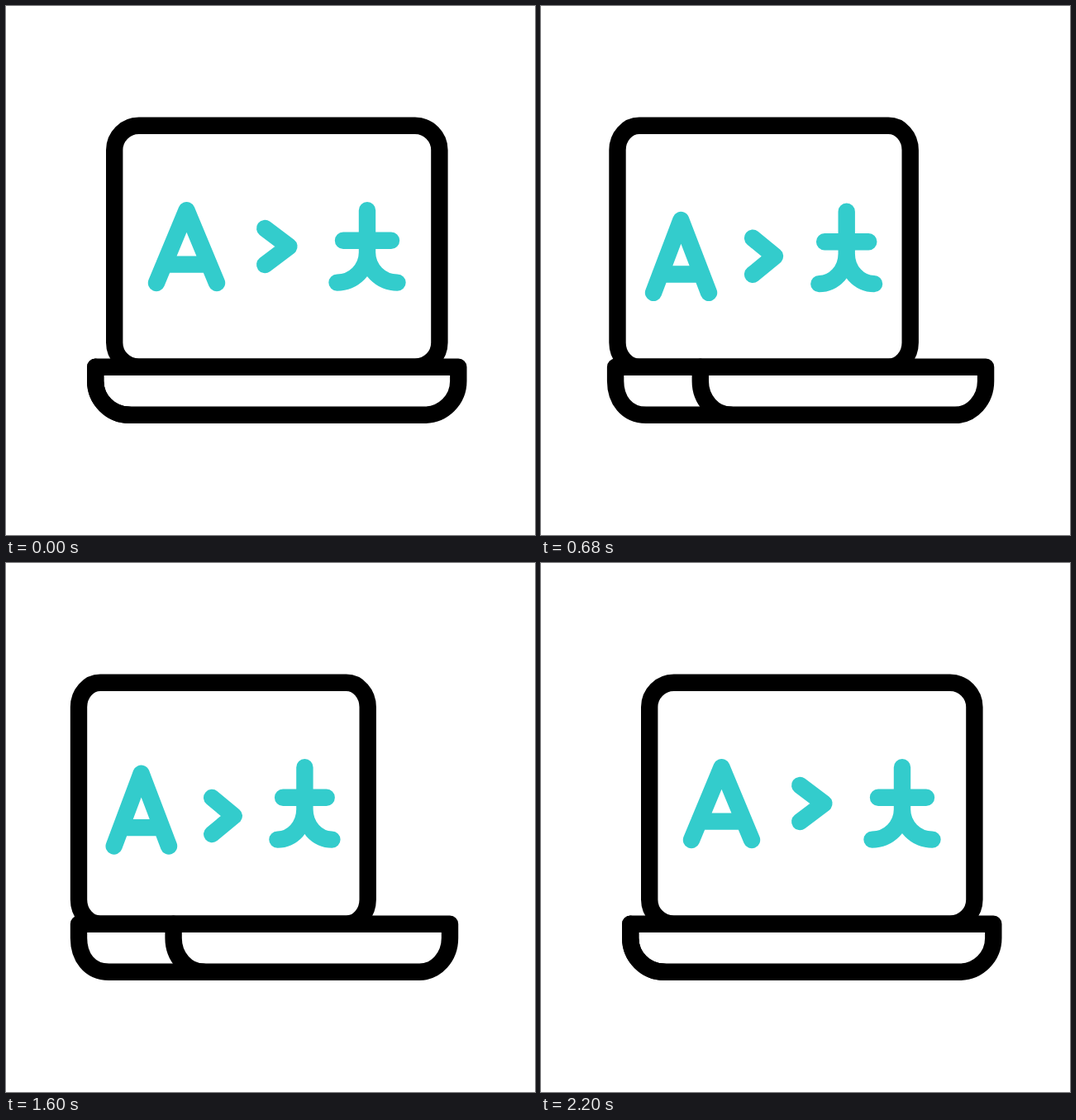
Animation of 640x640 px, one loop 2400 ms. Source, as an HTML page:

```html
<!DOCTYPE html>
<html lang="en">
<head>
<meta charset="utf-8">
<title>Translating laptop</title>
<style>
  html, body { margin: 0; height: 100%; overflow: hidden; background: #fff; }
  svg { display: block; width: 100vw; height: 100vh; }
  path { fill: none; stroke: #000; stroke-width: 20.4; stroke-linecap: round; stroke-linejoin: round; }
  .glyph { stroke: #33cccc; }
</style>
</head>
<body>
<svg viewBox="0 0 640 640">
  <path id="screen"/>
  <path id="side"/>
  <path id="panel"/>
  <path id="latin" class="glyph"/>
  <path id="arrow" class="glyph"/>
  <path id="han" class="glyph"/>
</svg>
<script>
const LOOP = 2400, STEP = 20, SWING = 15;
const ease = u => {
  u = Math.min(1, Math.max(0, u));
  return u * u * (3 - 2 * u);
};

// How far the laptop is turned: 0 faces front, 1 is fully turned
const turn = t => ease((t - 200) / 600) - ease((t - 1600) / 600);

// Down, up, down and back to rest, 400 ms for each move
const bob = (t, start) => {
  const e = i => ease((t - start) / 400 - i);
  return SWING * (e(0) - 2 * e(1) + 2 * e(2) - e(3));
};

const draw = (id, d) => document.getElementById(id).setAttribute("d", d);
const glyph = (id, d, y) => {
  draw(id, d);
  document.getElementById(id).setAttribute("transform", `translate(0 ${y})`);
};

function render(t) {
  const p = turn(t);
  const mix = (a, b) => a + (b - a) * p;
  const bow = 4 * p * (1 - p);

  // Screen
  const l = mix(131.2, 88), r = mix(524.4, 437.7), c = mix(29.5, 26);
  const corner = (dx, dy) => `a${c} 29.5 0 0 1 ${dx * c} ${dy * 29.5}`;
  draw("screen", `M${l + c} 144.8H${r - c}${corner(1, 1)}V407.2${corner(-1, 1)}
    H${l + c}${corner(-1, -1)}V174.3${corner(1, -1)}Z`);

  // Base: front panel and the side that turns into view
  const pl = mix(108.2, 202.6), pr = mix(547.3, 537), pc = mix(41, 36.7);
  draw("panel", `M${pl} 436.7V453.8a${pc} 41 0 0 0 ${pc} 41H${pr - pc}
    a${pc} 41 0 0 0 ${pc} -41V436.7Z`);
  const sl = mix(108.2, 88), sc = mix(41, 36.5), k = mix(0.45, 0.35);
  draw("side", `M${pl} 436.7H${sl}V453.8
    c0 22.6 ${sc * k} 41 ${sc} 41H${pl + pc}`);

  // Letter A
  const ax = mix(218.5, 163.6), al = mix(182, 130.7), ar = mix(255, 197);
  const bar = 0.745;
  glyph("latin", `M${al} 335L${ax} 247.2L${ar} 335
    M${ax + (al - ax) * bar} 312.6H${ax + (ar - ax) * bar}`, bob(t, 200));

  // Arrow
  const gx = mix(313.2, 249.2) + 0.6 * bow, tip = mix(342.4, 275.8) + 0.6 * bow;
  glyph("arrow", `M${gx} 269L${tip} 291L${gx} 313`, bob(t, 400));

  // Character
  const hx = mix(437, 361.4) + 1.2 * bow, arm = mix(29, 26.3), foot = mix(36.5, 33);
  glyph("han", `M${hx} 247.2V298M${hx - arm} 283.7H${hx + arm}
    M${hx - foot} 334.6A${foot} 36.5 0 0 0 ${hx} 298
    A${foot} 36.5 0 0 0 ${hx + foot} 334.6`, bob(t, 600));
}

const begin = performance.now();
function frame() {
  const t = (performance.now() - begin) % LOOP;
  render(Math.floor(t / STEP) * STEP);
  requestAnimationFrame(frame);
}
frame();
</script>
</body>
</html>
```
